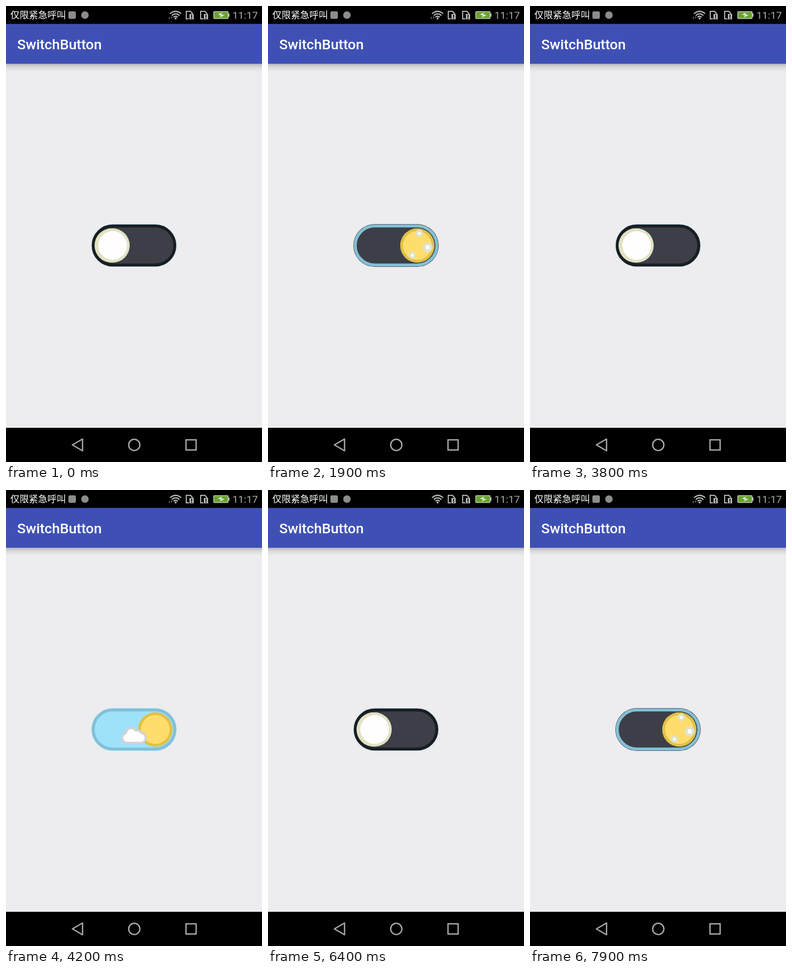
An HTML page for the animation above (8 s loop, 480 px wide and 853 px high).

```html
<!DOCTYPE html>
<html lang="zh">
<head>
<meta charset="utf-8">
<title>SwitchButton</title>
<style>
  html, body { margin: 0; height: 100%; overflow: hidden; background: #edecee; }
  svg { display: block; width: 100%; height: 100%; }
  .line { fill: none; stroke: #a8a8a8; stroke-width: 2.5; }
</style>
</head>
<body>
<svg viewBox="0 0 480 853">
  <defs>
    <linearGradient id="shade" x2="0" y2="1">
      <stop stop-color="#b4b3b9"/>
      <stop offset=".4" stop-color="#d9d8db"/>
      <stop offset="1" stop-color="#edecee"/>
    </linearGradient>
    <g id="sim">
      <path d="M1 1H9L12.500 5V7M1 0V15H6" fill="none" stroke="#b4b4b4" stroke-width="2"/>
      <path d="M7 6H15V16H7Z" fill="#b4b4b4"/>
      <path d="M11 7.500V12M11 13V15" stroke="#000" stroke-width="1.800"/>
    </g>
    <g id="puff">
      <circle cx="227.500" cy="463.500" r="7.500"/>
      <circle cx="235" cy="455.500" r="8.300"/>
      <circle cx="246" cy="458" r="6.500"/>
      <circle cx="252.500" cy="463.500" r="7.500"/>
      <path d="M227.500 457H252.500V471H227.500Z"/>
    </g>
  </defs>
  <rect width="480" height="853" fill="#edecee"/>

  <!-- status bar -->
  <rect width="480" height="34" fill="#000"/>
  <text x="8" y="23" font-size="17.400" fill="#fff" font-family="'Noto Sans CJK SC','Noto Sans CJK',sans-serif">仅限紧急呼叫</text>
  <rect x="117" y="10" width="14" height="14" rx="3" fill="#8c8c8c"/>
  <circle cx="148" cy="17" r="7" fill="#8c8c8c"/>
  <g fill="none" stroke="#b8b8b8" stroke-width="2.200">
    <path d="M307.500 14.500Q318 5.500 328.500 14.500M310.800 17.800Q318 11.500 325.200 17.800M314 21Q318 17.500 322 21"/>
  </g>
  <circle cx="318" cy="23.300" r="1.900" fill="#b8b8b8"/>
  <path id="arrows" d="M305 23L307 19V25ZM309 20H312L310.500 24Z" fill="#777"/>
  <use href="#sim" x="337" y="9"/>
  <use href="#sim" x="364" y="9"/>
  <rect x="389.500" y="10.500" width="27" height="13" rx="1.500" fill="#69a22d" stroke="#c4c8c0" stroke-width="1.500"/>
  <rect x="417" y="14" width="2" height="6" fill="#b8b8b8"/>
  <path d="M397 16L405 12.500L404 16L410 17L401 21.500L403 17.500Z" fill="#e4eadc"/>
  <text x="424.500" y="24" font-size="19.200" fill="#acacac" font-family="Roboto,sans-serif">11:17</text>

  <!-- title bar -->
  <rect y="108" width="480" height="15" fill="url(#shade)"/>
  <rect y="33.500" width="480" height="74.500" fill="#3f50b5"/>
  <text x="21" y="81" font-size="26.500" font-weight="500" fill="#fff" font-family="Roboto,sans-serif">SwitchButton</text>

  <g id="toggle"></g>

  <!-- navigation bar -->
  <rect y="789" width="480" height="64" fill="#000"/>
  <path class="line" d="M124.500 821L143.500 810V832Z" stroke-linejoin="round"/>
  <circle class="line" cx="240.500" cy="821" r="10.500"/>
  <rect class="line" x="337.500" y="811.500" width="19" height="19"/>
</svg>
<script>
const LOOP = 8000, STEP = 100, DURATION = 360;
const TOGGLES = [0, 1900, 3800, 5100, 6400, 7900]; // alternately to day and to night
const LEFT = 200, TRAVEL = 80, CY = 448;

// colours as [night, day]
const SKY = ['#3c3f48', '#9ee1fb'];
const BORDER = [[28, 29, 31], [132, 192, 214]];
const RING = [[224, 226, 195], [224, 192, 72]];
const DISC = [[255, 253, 254], [255, 221, 108]];

// x, y, radius, and whether the star overshoots while appearing
const STARS = [
  [240, 424, 4, 1], [280, 424, 3.5, 1], [260, 440, 3.5, 1], [293, 444, 5.5, 0],
  [268, 456, 2.7, 1], [288, 464, 5, 0], [248, 468, 4.8, 0]
];
// offset from the moon's centre, outer and inner radius
const CRATERS = [[10, -17, 9.5, 4.3], [-20, -11, 7, 2.7], [14, 15, 7, 2.7]];

const toggle = document.getElementById('toggle');
const arrows = document.getElementById('arrows');

const mix = ([a, b], k) => `rgb(${a.map((v, i) => Math.round(v + (b[i] - v) * k))})`;
const circle = (x, y, r, fill) => `<circle cx="${x}" cy="${y}" r="${r}" fill="${fill}"/>`;
const pill = (inset, attrs) =>
  `<rect x="${160 + inset}" y="${408 + inset}" width="${160 - 2 * inset}" height="${80 - 2 * inset}" rx="${40 - inset}" ${attrs}/>`;
const scaled = (k, x, y, body) =>
  `<g transform="translate(${x} ${y}) scale(${k}) translate(${-x} ${-y})">${body}</g>`;

function sky(toDay, p, day) {
  const night = toDay ? scaled(0.98 * (1 - p), LEFT + TRAVEL, CY, pill(1, `fill="${SKY[0]}"`)) : '';
  return pill(0, `fill="${SKY[+toDay]}"`) + night +
    pill(3.5, `fill="none" stroke="${mix(BORDER, day)}" stroke-width="5.500"`);
}

function stars(q) {
  return STARS.map(([x, y, r, over]) =>
    circle(x, y, over ? r * q + 4.6 * Math.sin(Math.PI * q) : r * q * q, '#fff')).join('');
}

function knob(toDay, p, day) {
  const along = k => LEFT + TRAVEL * (toDay ? k : 1 - k);
  const lead = along(Math.min(1, p / 0.8));
  const trail = along(p) - (toDay ? 2 * (1 - p) : 0);
  const ring = mix(RING, day);
  const craters = CRATERS.map(([x, y, outer, inner]) =>
    circle(lead + x, CY + y, outer, '#e0e3c6') + circle(lead + x, CY + y, inner, '#fff')).join('');
  return circle(trail, CY, 32, ring) + circle(lead, CY, 32, ring) +
    circle(lead, CY, 27, mix(DISC, day)) +
    (toDay ? '' : `<g transform="rotate(${70 * (1 - p)} ${lead} ${CY})">${craters}</g>`);
}

function cloud(q) {
  return scaled(q, 240, 460,
    '<use href="#puff" fill="#d5d0d3" stroke="#d5d0d3" stroke-width="8"/><use href="#puff" fill="#fff"/>');
}

function draw(now) {
  const t = Math.floor(now % LOOP / STEP) * STEP;
  const i = TOGGLES.findLastIndex(start => start <= t);
  const toDay = i % 2 === 0;
  const p = Math.min(1, (t - TOGGLES[i]) / DURATION);
  const day = toDay ? p : 1 - p;
  const q = Math.max(0, 2 * p - 1); // scenery appears in the second half

  toggle.innerHTML = sky(toDay, p, day) + (toDay ? '' : stars(q)) +
    knob(toDay, p, day) + (toDay ? cloud(q) : '');
  arrows.style.display = t >= 5800 && t < 6600 ? 'none' : '';
}

const begin = performance.now();
function tick() {
  draw(performance.now() - begin);
  requestAnimationFrame(tick);
}
tick();
</script>
</body>
</html>
```
